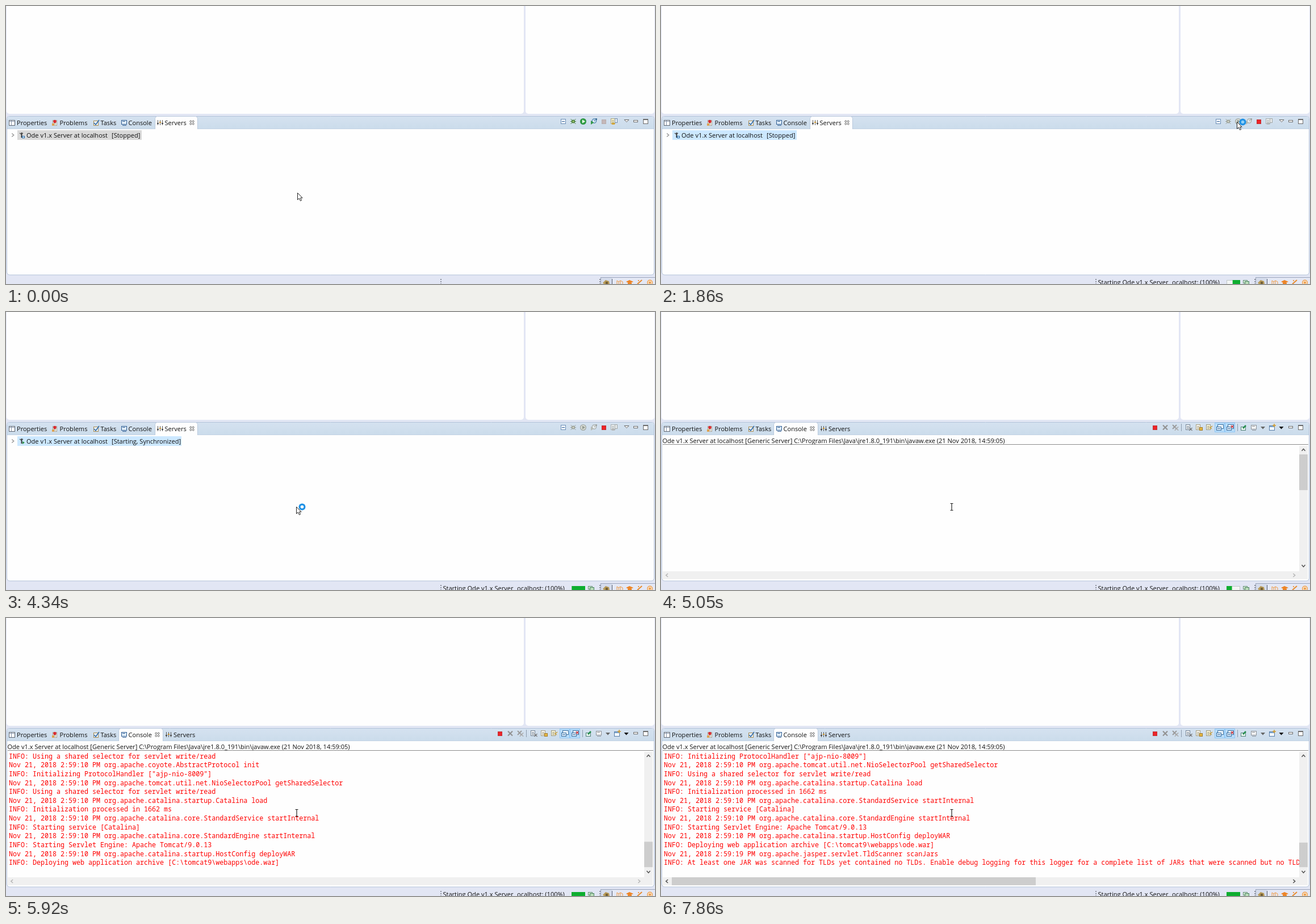
Recreate the animation shown at these times as an HTML page with a canvas. Size 1143 by 490 pixels, loop 8 s.

```html
<!DOCTYPE html>
<html lang="en">
<head>
<meta charset="utf-8">
<title>Server start</title>
<style>
html, body { margin: 0; width: 100%; height: 100%; overflow: hidden; background: #e2e6f4; }
canvas { display: block; }
</style>
</head>
<body>
<canvas id="stage" width="1143" height="490"></canvas>
<script>
const ctx = document.getElementById('stage').getContext('2d');
const LOOP = 8000;
const UI = '11.05px "Open Sans", "Noto Sans", sans-serif';
const MONO = '11.68px "Noto Sans Mono", "DejaVu Sans Mono", monospace';
const RUN_AT = 1790, SYNC_AT = 2090, CONSOLE_AT = 4600;

// Cursor waypoints: time, x, y
const PATH = [
  [70, 513, 329], [300, 585, 311], [850, 839, 241], [1100, 975, 210], [1300, 1053, 193],
  [1500, 1022, 203], [1700, 1014, 204], [2100, 1014, 204], [2175, 900, 241], [2250, 819, 260],
  [2330, 754, 266], [2405, 667, 270], [2480, 611, 295], [2560, 562, 330], [2630, 529, 340],
  [2940, 511, 343]
];

// Console states: time, first line, total lines, first painted row
const SCROLL = [
  [0, 0, 42, 14], [5110, 28, 42, 14], [5520, 28, 43, 9], [5680, 31, 53, 0],
  [5840, 39, 53, 0], [5920, 45, 59, 0], [6520, 46, 60, 0], [6600, 47, 61, 0]
];

const FIRST_LOGGED = 31;
const stamp = (second, rest) => `Nov 21, 2018 2:59:${second} PM org.apache.${rest}`;
const lifecycle = stamp('09', 'catalina.core.AprLifecycleListener lifecycleEvent');
const selector = stamp('10', 'tomcat.util.net.NioSelectorPool getSharedSelector');
const shared = 'INFO: Using a shared selector for servlet write/read';
const LOG = [
  'INFO: Command line argument: -XX:MaxPermSize=256m',
  stamp('09', 'catalina.startup.VersionLoggerListener log'),
  'INFO: Command line argument: -Dfile.encoding=Cp1252',
  lifecycle,
  'INFO: Loaded APR based Apache Tomcat Native library [1.2.18] using APR version [1.6.5].',
  lifecycle,
  'INFO: APR capabilities: IPv6 [true], sendfile [true], accept filters [false], random [true].',
  lifecycle,
  'INFO: APR/OpenSSL configuration: useAprConnector [false], useOpenSSL [true]',
  stamp('09', 'catalina.core.AprLifecycleListener initializeSSL'),
  'INFO: OpenSSL successfully initialized [OpenSSL 1.1.1  11 Sep 2018]',
  stamp('09', 'coyote.AbstractProtocol init'),
  'INFO: Initializing ProtocolHandler ["http-nio-9090"]',
  selector,
  shared,
  stamp('10', 'coyote.AbstractProtocol init'),
  'INFO: Initializing ProtocolHandler ["ajp-nio-8009"]',
  selector,
  shared,
  stamp('10', 'catalina.startup.Catalina load'),
  'INFO: Initialization processed in 1662 ms',
  stamp('10', 'catalina.core.StandardService startInternal'),
  'INFO: Starting service [Catalina]',
  stamp('10', 'catalina.core.StandardEngine startInternal'),
  'INFO: Starting Servlet Engine: Apache Tomcat/9.0.13',
  stamp('10', 'catalina.startup.HostConfig deployWAR'),
  'INFO: Deploying web application archive [C:\\tomcat9\\webapps\\ode.war]',
  stamp('19', 'jasper.servlet.TldScanner scanJars'),
  'INFO: At least one JAR was scanned for TLDs yet contained no TLDs. Enable debug logging for this logger for a complete list of JARs that were scanned but no TLDs were found in them.'
];

function rect(x, y, w, h, color) {
  ctx.fillStyle = color;
  ctx.fillRect(x, y, w, h);
}
function frame(x, y, w, h, stroke, fill = '#fff') {
  rect(x, y, w, h, stroke);
  rect(x + 1, y + 1, w - 2, h - 2, fill);
}
function rounded(x, y, w, h, radii, fill, stroke) {
  ctx.beginPath();
  ctx.roundRect(x, y, w, h, radii);
  ctx.fillStyle = fill;
  ctx.fill();
  if (stroke) { ctx.strokeStyle = stroke; ctx.lineWidth = 1; ctx.stroke(); }
}
function trace(points) {
  ctx.beginPath();
  for (let i = 0; i < points.length; i += 2) ctx.lineTo(points[i], points[i + 1]);
}
function line(points, color, width = 1) {
  trace(points);
  ctx.strokeStyle = color;
  ctx.lineWidth = width;
  ctx.stroke();
}
function poly(points, color) {
  trace(points);
  ctx.fillStyle = color;
  ctx.fill();
}
function outlined(points, stroke) {
  poly(points, '#fff');
  ctx.closePath();
  ctx.strokeStyle = stroke;
  ctx.lineWidth = 1;
  ctx.stroke();
}
function dot(x, y, r, color) {
  ctx.beginPath();
  ctx.arc(x, y, r, 0, Math.PI * 2);
  ctx.fillStyle = color;
  ctx.fill();
}
function text(s, x, y, color = '#111', font = UI) {
  ctx.font = font;
  ctx.fillStyle = color;
  ctx.fillText(s, x, y);
}
function cross(x, y, r, color, width) {
  line([x - r, y - r, x + r, y + r], color, width);
  line([x - r, y + r, x + r, y - r], color, width);
}
function chevron(x, y, dx, dy, color) {
  line([x - 3 * dy - 1.7 * dx, y - 3 * dx - 1.7 * dy, x + 1.7 * dx, y + 1.7 * dy,
    x + 3 * dy - 1.7 * dx, y + 3 * dx - 1.7 * dy], color, 1.5);
}
const triangleDown = (x, y, color) => poly([x - 4, y - 2, x + 4, y - 2, x, y + 2.5], color);

function monitor(x, y, color, screen = '#fff') {
  frame(x - 5, y - 5, 10, 8, color, screen);
  rect(x - 3, y - 3, 5, 1, color);
  rect(x - 3, y + 4, 7, 1, color);
}
function page(x, y, edge, fill = '#fff') {
  frame(x - 4, y - 5, 8, 10, edge, fill);
  for (let i = -2; i < 3; i += 2) rect(x - 2, y + i, 4, 1, edge);
}

function drawTabs(onConsole) {
  const bar = ctx.createLinearGradient(0, 194, 0, 216);
  bar.addColorStop(0, '#d5e2f0');
  bar.addColorStop(1, '#cbdceb');
  rounded(1.5, 194.5, 1140, 279.5, [4, 4, 5, 5], '#fefefe', '#b3c3d9');
  rounded(2, 195, 1139, 21, [4, 4, 0, 0], bar);
  rect(2, 216, 1139, 1, '#c3d3e5');

  const left = onConsole ? 198.5 : 262.5, right = onConsole ? 276.5 : 337.5;
  rounded(left, 194.5, right - left, 25, [4, 4, 0, 0], '#fefefe', '#b9c9dd');
  rect(left - 1, 217, right - left + 2, 4, '#fefefe');

  frame(5, 201, 11, 10, '#5f6773');
  rect(6, 203, 9, 1, '#8795a9');
  rect(9, 202, 1, 8, '#8795a9');
  page(86, 206, '#a7a295', '#fffdf2');
  dot(86, 203.5, 2.7, '#d8282f');
  rect(81, 207, 4, 4, '#dca253');
  frame(154, 202, 9, 9, '#a88b50', '#eef5fc');
  line([155, 206, 158, 209, 164, 201], '#2f6baa', 1.6);
  monitor(208, 206, '#2b5a91', '#e5f1fb');

  const serversX = onConsole ? 295 : 279.5, poles = Math.round(serversX - 9);
  for (let i = -1; i < 2; i++) {
    rect(poles + i * 4, 201, 1, 9, '#555');
    rect(poles + i * 4 - 1, 204 + (i & 1) * 2, 3, 2, i ? '#4f4f4f' : '#d29b34');
  }

  text('Properties', 19, 210);
  text('Problems', 94.5, 210);
  text('Tasks', 166.5, 210);
  text('Console', 215.5, 210);
  text('Servers', serversX, 210);
  const closeX = right - 10;
  cross(closeX, 205.5, 3.4, '#666', 3);
  cross(closeX, 205.5, 3, '#fff', 1.2);

  frame(1105, 201, 8, 4, '#6b6b6b');
  frame(1122, 199, 9, 9, '#6b6b6b');
  rect(1122, 200, 9, 1, '#6b6b6b');
}

function drawServerTools(running) {
  const tint = (on, off = '#a2a7a5') => running ? off : on;
  frame(977, 199, 9, 9, '#6d8fb7', '#f1f7fd');
  rect(979, 203, 5, 1, '#335e92');

  const bug = tint('#427b36', '#989d92');
  cross(999, 203.5, 4.3, bug, 1);
  line([994, 203.5, 1004, 203.5], bug);
  dot(999, 203.5, 3, bug);
  dot(999, 203.5, 1.5, tint('#a9cb76', '#d5d9cd'));

  dot(1016.5, 203.5, 5.5, tint('#258a3d', '#9da39d'));
  dot(1016.5, 203.5, 4.4, tint('#37a448', '#d4d9d2'));
  poly([1015, 200.5, 1015, 206.5, 1020, 203.5], tint('#fff', '#92998f'));

  dot(1036, 202.5, 4.2, tint('#417daf'));
  dot(1036, 202.5, 3, '#eef4f7');
  line([1036, 200, 1036, 203, 1038.5, 202], tint('#417daf'));
  poly([1030, 202, 1030, 209, 1035.5, 205.5], tint('#35984b', '#b6bab4'));
  rect(1038, 198, 3, 3, tint('#47759d'));

  frame(1049, 200, 8, 8, running ? '#bd3032' : '#b7acad', running ? '#ef2327' : '#c4b8b9');

  page(1069, 203, tint('#a8a27e', '#a7adaf'), tint('#fff6d2', '#edf0f1'));
  frame(1072, 198, 5, 8, tint('#718cae'), tint('#e7eef7', '#e8ebed'));
  rect(1067, 206, 5, 3, tint('#d5a739', '#b5b7b8'));
  outlined([1089, 200.5, 1097, 200.5, 1093, 204.5], '#666');
}

function drawServerRow(t) {
  const synced = t >= SYNC_AT;
  rect(20, 219, synced ? 289 : 219, 17, t < 70 ? '#d9d9d9' : '#cce8ff');
  chevron(12, 227.5, 1, 0, '#999');
  line([27.5, 223, 27.5, 232], '#2b2b2b', 1.8);
  line([24, 224, 27, 226, 30, 224], '#444', 1.2);
  if (synced) {
    const shift = t < 3110 ? 0 : Math.floor((t - 3110) / 220) % 2;
    poly([29, 227 + shift, 29, 233, 33, 230], '#2c9147');
  } else {
    frame(28, 229, 5, 4, '#2367a5', '#d9eaf8');
  }
  text('Ode v1.x Server at localhost', 36, 231.5);
  text(synced ? '[Starting, Synchronized]' : '[Stopped]', 186, 231.5);
}

function drawConsoleTools() {
  frame(866, 200, 8, 8, '#c33235', '#ee2429');
  cross(888, 203.5, 4, '#929292', 2.2);
  cross(904.5, 202.5, 3.5, '#989898', 1.8);
  cross(908, 205.5, 3.2, '#aaa', 1.5);
  rect(916, 197, 1, 13, '#8d9bad');
  page(928, 203, '#718192');
  cross(933, 206.5, 2.5, '#777', 1.3);
  page(946, 203, '#a49c7c');
  frame(948, 203, 6, 6, '#a17927', '#e6b843');
  page(964, 203, '#9a967d', '#fff9dd');
  line([971, 201, 967, 204, 970, 206], '#c8992a', 1.3);
  for (const x of [975, 993]) {
    frame(x, 195, 18, 17, '#90c8f6', '#b9dcf8');
    frame(x + 5, 198, 11, 8, '#386d9f', '#edf6fc');
    frame(x + 3, 202, 9, 7, '#386d9f', '#dcebf8');
    rect(x + 5, 205, 5, 1, '#386d9f');
  }
  cross(1006, 202, 2, '#d3343a', 1.5);
  rect(1015, 197, 1, 13, '#8d9bad');
  frame(1021, 202, 9, 7, '#528078', '#e7f4ef');
  line([1025, 205, 1030, 200], '#288e50', 2.6);
  monitor(1044, 204, '#8d9299', '#f3f4f5');
  triangleDown(1060, 204, '#666');
  frame(1071, 200, 10, 9, '#587da7', '#f4f9fe');
  rect(1072, 201, 8, 2, '#80a9d0');
  line([1080, 197, 1080, 203], '#d49b28', 1.5);
  line([1077, 200, 1083, 200], '#d49b28', 1.5);
  triangleDown(1092.5, 204, '#111');
}

function drawConsole(t) {
  const [, first, total, painted] = SCROLL.findLast(s => t >= s[0]);
  text('Ode v1.x Server at localhost [Generic Server] C:\\Program Files\\Java\\jre1.8.0_191\\bin\\javaw.exe (21 Nov 2018, 14:59:05)', 2.5, 230.5);
  rect(3, 233, 1137, 1, '#8b8b8b');

  ctx.save();
  ctx.beginPath();
  ctx.rect(3, 236, 1121, 220);
  ctx.clip();
  // The last line of the console is always empty
  for (let row = painted; row < 14 && first + row < total - 1; row++) {
    text(LOG[first + row - FIRST_LOGGED], 5, 247.8 + row * 15.615, '#f00', MONO);
  }
  ctx.restore();

  const wide = t >= 6600;
  const track = 188 / total;
  rect(1124, 236, 15, 221, '#f0f0f0');
  rect(1124, 251 + first * track, 15, 14.05 * track, '#cdcdcd');
  chevron(1131.5, 243, 0, -1, '#505050');
  chevron(1131.5, 447.5, 0, 1, '#505050');
  rect(3, 457, 1136, 14, '#f0f0f0');
  if (wide) rect(19, 457, 641, 14, '#cdcdcd');
  const arrow = wide ? '#505050' : '#b5b5b5';
  chevron(10.5, 464, -1, 0, arrow);
  chevron(1115, 464, 1, 0, arrow);
}

function drawProgress(t) {
  text('Starting Ode v1.x Server', 769.5, 491);
  text('ocalhost: (100%)', 900, 491);
  frame(996, 483, 24, 9, '#bfc7c6', '#f3f5f5');
  // The block leaves to the right, then refills from the left
  const phase = (t - 1720) % 2615;
  const clamp = v => Math.max(0, Math.min(24, v));
  const gone = clamp(phase * .076);
  if (gone < 24) rect(996 + gone, 483, 24 - gone, 7, '#0eae30');
  else rect(996, 483, clamp((phase - 590) * .076), 7, '#0eae30');
  frame(1025, 483, 8, 6, '#669178', '#d6ead7');
  frame(1028, 485, 8, 6, '#4e8660', '#b9dbb9');
}

function drawStatusBar(t) {
  for (const x of [765, 1045]) for (let y = 481; y < 490; y += 4) rect(x, y, 2, 2, '#8f939e');
  if (t >= RUN_AT) drawProgress(t);
  frame(1047, 478, 110, 20, '#9ba5bb', '#e4e8f5');
  rect(1048, 479, 19, 11, '#d5dcec');
  rect(1067, 481, 1, 9, '#545c70');
  poly([1051, 488, 1056, 483, 1062, 485, 1063, 490, 1053, 490], '#b79a58');
  rect(1056, 486, 4, 4, '#735f36');
  const orange = '#ef9b45';
  line([1076, 490, 1076, 484, 1079, 486, 1082, 484, 1086, 486, 1086, 490], orange);
  line([1079, 486, 1079, 490], orange);
  line([1082, 484, 1082, 490], orange);
  poly([1092, 486, 1098, 483, 1105, 486, 1098, 489], '#ed8526');
  rect(1095, 488, 7, 2, '#ed8526');
  line([1112, 490, 1120, 483], '#e98c2c', 2);
  rect(1113, 483, 2, 2, orange);
  dot(1134, 487.5, 5, orange);
  dot(1134, 487.5, 3.8, '#f8dfc0');
  dot(1134, 487.5, 2, orange);
}

function cursorAt(t) {
  const next = PATH.findIndex(p => p[0] > t);
  if (next === 0) return PATH[0].slice(1);
  if (next < 0) return PATH.at(-1).slice(1);
  const [t0, x0, y0] = PATH[next - 1], [t1, x1, y1] = PATH[next];
  const k = (t - t0) / (t1 - t0);
  return [x0 + (x1 - x0) * k, y0 + (y1 - y0) * k];
}

function drawCursor(t) {
  if (t >= CONSOLE_AT) {
    line([509.5, 337.5, 514.5, 337.5], '#222');
    line([512, 337.5, 512, 349.5], '#222', 1.2);
    line([509.5, 349.5, 514.5, 349.5], '#222');
    return;
  }
  const [x, y] = cursorAt(t);
  ctx.save();
  ctx.translate(x + .5, y + .5);
  outlined([0, 0, 0, 12, 2.8, 9.5, 5, 14, 7, 13, 5, 8.7, 8.6, 8.7], '#222');
  if (t >= RUN_AT) {
    dot(10, 0, 6, '#1f91e5');
    dot(10, 0, 2.8, t < SYNC_AT ? '#8fd0f7' : '#fff');
  }
  ctx.restore();
}

function draw(now) {
  const t = now % LOOP;
  const onConsole = t >= CONSOLE_AT;
  rect(0, 0, 1143, 490, '#e2e6f4');
  rounded(1, -9, 911, 199, 5, '#fefefe');
  rounded(915, -9, 227, 199, 5, '#fefefe');
  drawTabs(onConsole);
  if (onConsole) {
    drawConsoleTools();
    drawConsole(t);
  } else {
    drawServerTools(t >= RUN_AT);
    drawServerRow(t);
  }
  drawStatusBar(t);
  drawCursor(t);
}

const start = performance.now();
(function tick() {
  draw(performance.now() - start);
  requestAnimationFrame(tick);
})();
</script>
</body>
</html>
```
